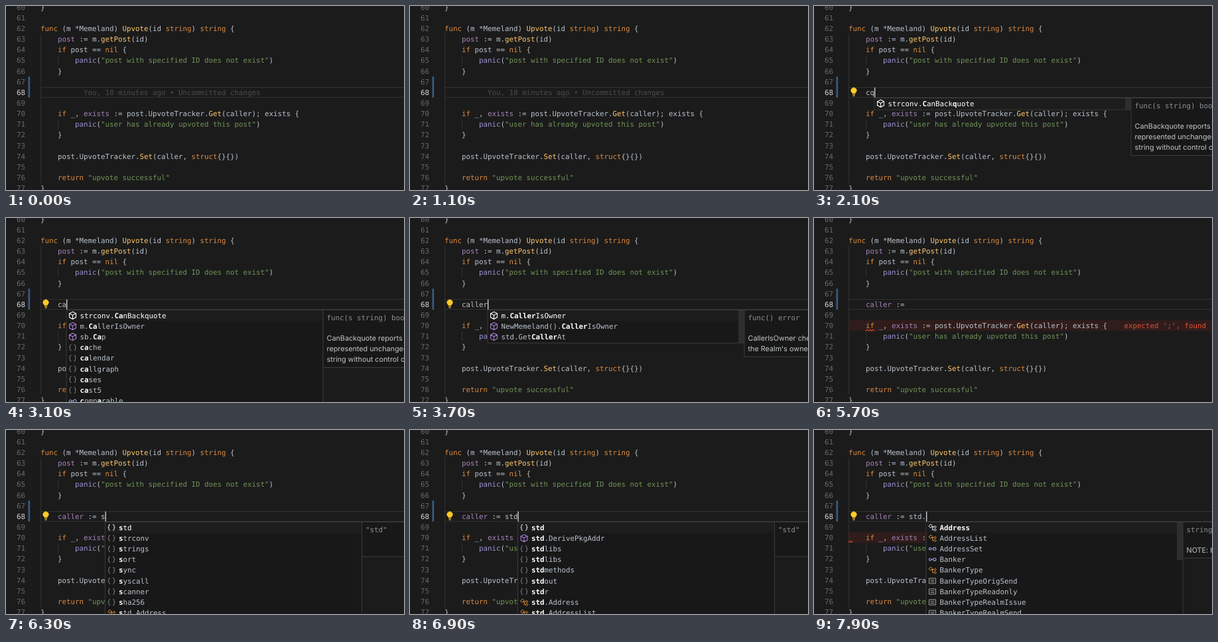
Recreate the animation shown at these times as an HTML page. Size 600 by 279 pixels, loop 8 s.

```html
<!DOCTYPE html>
<html lang="en">
<head>
<meta charset="utf-8">
<title>Editor completion</title>
<style>
  html, body { margin: 0; width: 100%; height: 100%; overflow: hidden; background: #1b1b1b; }
  svg { display: block; width: 600px; height: 279px; }
  text {
    font: 10.8px "DejaVu Sans Mono", "Liberation Mono", monospace;
    fill: #b9c2cc; white-space: pre; text-rendering: geometricPrecision;
  }
  .num { fill: #68696c; }
  .now { fill: #d8d8d8; }
  .note { fill: #4b4b4b; }
  .kw { fill: #db8a40; }
  .str { fill: #709358; }
  .fn { fill: #ffc66d; }
  .built { fill: #9a92cf; }
  .var { fill: #a583ba; }
  .err { fill: #dc5236; }
  .head { fill: #8a8f94; }
  .doc { font: 10.8px Inter, Roboto, sans-serif; fill: #c2c6ca; }
  .hit { font-weight: bold; fill: #fff; }
  .sel, .sel .hit { fill: #fff; }
</style>
</head>
<body>
<svg viewBox="0 0 600 279">
  <defs>
    <pattern id="hatch" width="3" height="3" patternUnits="userSpaceOnUse">
      <rect width="3" height="3" fill="#20354a"/>
      <path d="M-1 1L1 -1M0 3L3 0M2 4L4 2" stroke="#4f82b4" stroke-width="1.1"/>
    </pattern>
  </defs>
  <rect width="600" height="279" fill="#1b1b1b"/>
  <g id="under"></g>
  <g id="code"></g>
  <g id="over"></g>
</svg>
<script>
const LOOP = 8000, CHAR = 6.502, LEFT = 52, LINE = 16.15, ROW = 16.2;
const POP_TOP = 139.5, POP_WIDTH = 387;
const $ = id => document.getElementById(id);
const midY = n => 34.1 + (n - 62) * LINE;
const colX = col => LEFT + col * CHAR;

const text = (x, y, s, cls = '') => `<text x="${x}" y="${y + 3.8}" class="${cls}">${s}</text>`;
const rect = (x, y, w, h, fill, extra = '') =>
  `<rect x="${x}" y="${y}" width="${w}" height="${h}" fill="${fill}" ${extra}/>`;
const path = (d, color, width = 1, fill = 'none') =>
  `<path d="${d}" stroke="${color}" stroke-width="${width}" fill="${fill}"/>`;

const TOKENS = /("[^"]*")|\b(func|if|return|string|struct|nil)\b|\b(Upvote|getPost|Get|Set)(?=\()|\b(panic)\b|\b(\w+)(?= :=)/g;
const CLASSES = ['str', 'kw', 'fn', 'built', 'var'];
const paint = s => s.replace(TOKENS, (word, ...groups) =>
  `<tspan class="${CLASSES[groups.slice(0, 5).findIndex(Boolean)]}">${word}</tspan>`);

const SOURCE = `}

func (m *Memeland) Upvote(id string) string {
    post := m.getPost(id)
    if post == nil {
        panic("post with specified ID does not exist")
    }



    if _, exists := post.UpvoteTracker.Get(caller); exists {
        panic("user has already upvoted this post")
    }

    post.UpvoteTracker.Set(caller, struct{}{})

    return "upvote successful"
}`.split('\n');

// Completion rows: kind letter, then label
const LISTS = {
  c: 'm:strconv.CanBackquote m:m.CallerIsOwner m:sb.Cap n:cache n:calendar n:cmp n:color n:context n:crypto',
  cq: 'm:strconv.CanBackquote',
  ca: 'm:strconv.CanBackquote m:m.CallerIsOwner m:sb.Cap n:cache n:calendar n:callgraph n:cases n:cast5 i:comparable',
  cal: 'm:m.CallerIsOwner m:NewMemeland().CallerIsOwner m:std.GetCallerAt n:calendar n:callgraph',
  call: 'm:m.CallerIsOwner m:NewMemeland().CallerIsOwner m:std.GetCallerAt n:callgraph',
  caller: 'm:m.CallerIsOwner m:NewMemeland().CallerIsOwner m:std.GetCallerAt',
  s: 'n:std n:strconv n:strings n:sort n:sync n:syscall n:scanner n:sha256 c:std.Address',
  st: 'n:std n:strconv n:strings m:std.DerivePkgAddr n:stdlibs n:stdmethods n:stdout n:stdr c:std.Address',
  std: 'n:std m:std.DerivePkgAddr n:stdlibs n:stdlibs n:stdmethods n:stdout n:stdr c:std.Address c:std.AddressList',
  '': 'c:Address c:AddressList i:AddressSet i:Banker c:BankerType k:BankerTypeOrigSend k:BankerTypeReadonly k:BankerTypeRealmIssue k:BankerTypeRealmSend'
};
const DOCS = {
  quote: ['func(s string) bool', 'CanBackquote reports whether the string', 'represented unchanged as a single-line', 'string without control characters'],
  owner: ['func() error', 'CallerIsOwner checks if the caller is', "the Realm's owner"],
  pkg: ['"std"'],
  addr: ['string', 'NOTE: bech32 address']
};

// Each step: start, typed text, completion query, docs, scrollbar length, error shown
const STEPS = [
  { at: 0, typed: '', blinkFrom: -500, note: true },
  { at: 1400, typed: 'c', query: 'c', doc: 'quote' },
  { at: 1700, typed: 'cq', query: 'cq', doc: 'quote', bar: 17 },
  { at: 2400, typed: 'c', query: 'c', doc: 'quote' },
  { at: 2700, typed: 'ca', query: 'ca', doc: 'quote' },
  { at: 3300, typed: 'cal', query: 'cal', doc: 'owner' },
  { at: 3400, typed: 'call', query: 'call', doc: 'owner' },
  { at: 3500, typed: 'calle', query: 'call', doc: 'owner' },
  { at: 3600, typed: 'caller', query: 'caller', doc: 'owner', bar: 49 },
  { at: 3900, typed: 'caller ' },
  { at: 4000, typed: 'caller :' },
  { at: 4100, typed: 'caller :=' },
  { at: 4200, typed: 'caller := ' },
  { at: 4900, typed: 'caller := ', blinkFrom: 4200, error: true },
  { at: 6200, typed: 'caller := s', query: 's', doc: 'pkg' },
  { at: 6400, typed: 'caller := st', query: 'st', doc: 'pkg' },
  { at: 6600, typed: 'caller := std', query: 'std', doc: 'pkg' },
  { at: 7500, typed: 'caller := std.', query: '', doc: 'addr', bar: 57, error: true, dot: true }
];

function icon(kind, x, y, selected) {
  const pick = color => selected ? '#fff' : color;
  const at = shape => `<g transform="translate(${x} ${y})">${shape}</g>`;
  switch (kind) {
    case 'm': return at(path('M0 -5.5L5 -3V2.8L0 5.5L-5 2.8V-3ZM-5 -3L0 -.4L5 -3M0 -.4V5.5', pick('#a87fd0'), 1.1));
    case 'n': return at(path('M-2 -4.5Q-4 -4.5 -4 -2.6V-1Q-4 0 -5.2 0Q-4 0 -4 1V2.6Q-4 4.5 -2 4.5M2 -4.5Q4 -4.5 4 -2.6V-1Q4 0 5.2 0Q4 0 4 1V2.6Q4 4.5 2 4.5', pick('#858585')));
    case 'c': return at(path('M-5.5 -2L-2.5 -5L0 -2.5L-3 .5ZM-1.4 -1H2.2M.2 -1V3.6H2.2M2.2 -1L4 -2.8L5.8 -1L4 .8ZM2.2 3.6L4 1.8L5.8 3.6L4 5.4Z', pick('#e8963a')));
    case 'i': return at(path('M-1.7 0H1.5M-5.2 0A1.7 1.7 0 1 0 -1.8 0A1.7 1.7 0 1 0 -5.2 0M1.2 0A2.1 2.1 0 1 0 5.4 0A2.1 2.1 0 1 0 1.2 0', pick('#9b9be0'), 1.1));
    default: return at(path('M-5 -4H5V4H-5ZM-3 -1.2H3M-3 1.4H3', pick('#a0a0a0')));
  }
}

// Bold the typed run, or its letters in order after the last dot
function mark(label, query, selected) {
  const bold = s => `<tspan class="hit">${s}</tspan>`;
  if (!query) return selected ? bold(label) : label;
  const low = label.toLowerCase(), run = low.indexOf(query);
  if (run >= 0) {
    const end = run + query.length;
    return label.slice(0, run) + bold(label.slice(run, end)) + label.slice(end);
  }
  let next = 0;
  const from = low.lastIndexOf('.') + 1;
  return [...label].map((ch, i) =>
    i >= from && low[i] === query[next] ? (next++, bold(ch)) : ch).join('');
}

function popup({ query, doc, bar }, x) {
  const rows = LISTS[query].split(' ');
  const height = rows.length > 8 ? 160 : rows.length * ROW + 1.5;
  const border = 'stroke="#3c3c3c"';
  let out = rect(x, POP_TOP, POP_WIDTH, height, '#181818', border);
  out += rect(x + .5, POP_TOP + .5, POP_WIDTH - 1, ROW, '#1d1d1d');
  rows.forEach((row, i) => {
    const y = 147.8 + i * ROW, kind = row[0], label = row.slice(2);
    out += icon(kind, x + 9.5, y, !i) + text(x + 20.5, y, mark(label, query, !i), i ? '' : 'sel');
  });
  if (bar) out += rect(x + POP_WIDTH - 9, POP_TOP + .5, 8.5, bar, '#2e2e2e');

  const [head, ...lines] = DOCS[doc];
  const px = x + POP_WIDTH, tall = lines.length ? 38.5 + lines.length * 16.2 : 52.5;
  out += rect(px, POP_TOP, 200, tall, '#181818', border);
  out += text(px + 5.5, 151.3, head, 'head');
  lines.forEach((s, i) => { out += text(px + 5.5, 182 + i * 16.1, s, 'doc'); });
  return out;
}

const bulb = path('M58 132.7Q57.8 131.5 56.6 130.5A4.2 4.2 0 1 1 63.4 130.5Q62.2 131.5 62 132.7Z', '#ffc928', .7, '#ffc928')
  + path('M58 134.5H62M58.6 136.2H61.4', '#ffc928', 1.1);

function squiggle(x, width, y) {
  let d = `M${x} ${y + 1.5}`;
  for (let i = 1; i * 2.2 <= width; i++) d += `L${x + i * 2.2} ${y + (i % 2 ? -.8 : 1.5)}`;
  return path(d, '#e0442e', 1.1);
}

function drawCode() {
  let out = path(`M52.5 ${midY(63) - 8}V${midY(76) + 8}`, '#303030');
  for (const n of [65, 71]) out += path(`M78.5 ${midY(n) - 8}v16`, '#303030');
  out += rect(33.5, 107, 2.6, 32, 'url(#hatch)');
  SOURCE.forEach((line, i) => {
    const n = 60 + i, y = midY(n), indent = line.search(/\S/);
    out += text(16, y, n, n === 68 ? 'now' : 'num');
    if (indent >= 0) out += text(colX(indent), y, paint(line.slice(indent)));
  });
  $('code').innerHTML = out;
}

function drawStep(step, cursorOn) {
  let under = rect(52.5, 123.5, 560, 15, 'none', 'stroke="#303030"'), over = '';
  if (step.error) {
    under += rect(52, 155, 548, 16.2, '#301c1b');
    over += step.dot ? squiggle(52, 7, 169) : squiggle(78, 13.3, 170);
    over += text(467.5, midY(70), "expected ';', found", 'err');
  }
  const y = midY(68), x = colX(4 + step.typed.length);
  if (step.note) over += text(117, y, 'You, 18 minutes ago • Uncommitted changes', 'note');
  over += text(colX(4), y, paint(step.typed));
  if (step.doc) over += bulb + popup(step, x);
  if (cursorOn) over += rect(x, 123.5, 1.3, 15, '#d8d8d8');
  $('under').innerHTML = under;
  $('over').innerHTML = over;
}

let shown = '';
function tick() {
  const t = performance.now() % LOOP;
  const index = STEPS.findLastIndex(s => s.at <= t), step = STEPS[index];
  const cursorOn = (t - (step.blinkFrom ?? step.at)) % 1000 < 500;
  const key = index + ':' + cursorOn;
  if (key !== shown) drawStep(step, cursorOn);
  shown = key;
  requestAnimationFrame(tick);
}

drawCode();
tick();
</script>
</body>
</html>
```
